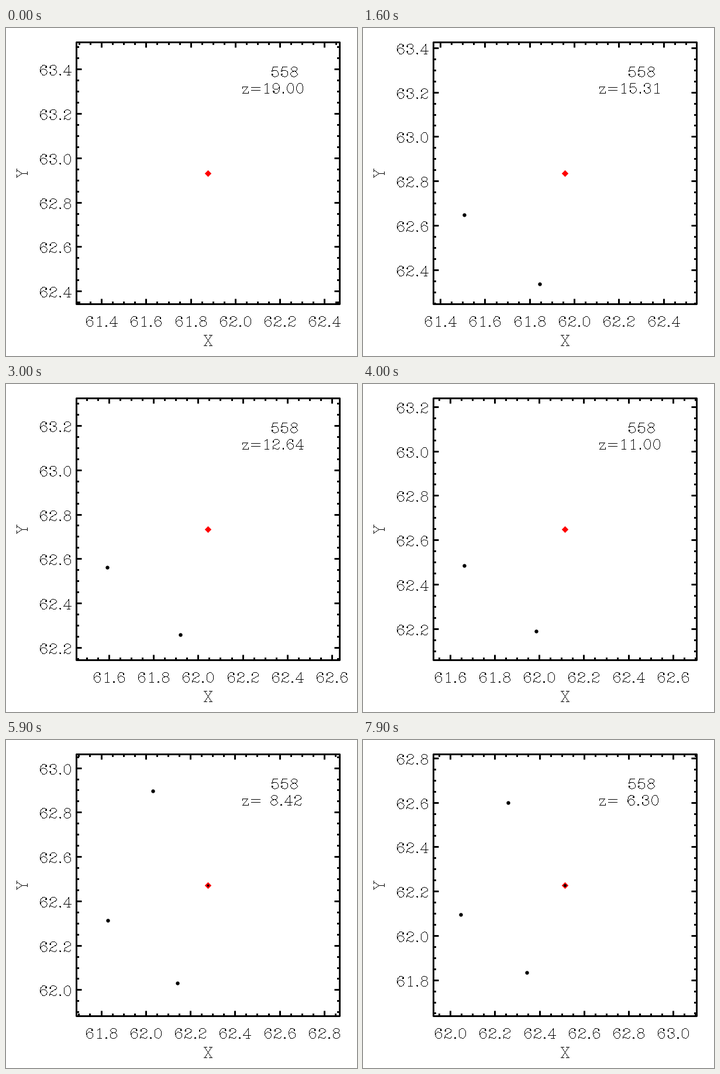
Write a matplotlib script that moves like this. It is 600 by 560 pixels and loops after 8000 ms.

```python
import matplotlib.pyplot as plt
import numpy as np
from matplotlib.animation import FuncAnimation
from matplotlib.collections import LineCollection
from matplotlib.patches import Circle, Polygon, Rectangle

W, H, DPI = 600, 560, 100
PX = 72 / DPI
FRAMES = 80
LEFT, RIGHT, TOP, BOTTOM = 120.5, 570.5, 24.5, 471.5
CX, CY = 345.5, 248.5
HALF = 0.59                # half the view, in data units
SX = (RIGHT - LEFT) / (2 * HALF)
SY = (BOTTOM - TOP) / (2 * HALF)
UNIT = 0.81                # pixels per font unit


# --- stroke font: baseline at 0, capital height 21 -------------------------
def arc(cx, cy, rx, ry, a0=0, a1=360):
    t = np.radians(np.linspace(a0, a1, int(abs(a1 - a0) / 20) + 2))
    return np.column_stack([cx + rx * np.cos(t), cy + ry * np.sin(t)])


def line(*pts):
    return np.array(pts, float)


def serif(x0, x1, y):
    return line((x0, y), (x1, y))


def ball(x, y):
    return arc(x, y, 1, 1)


SIX = [ball(5, 17), arc(0.5, 17, 5.5, 4, 90, 0),
       arc(0, 10.5, 7, 10.5, 90, 270), arc(0, 6.5, 7, 6.5, 170, -90)]

GLYPHS = {
    "0": [arc(0, 10.5, 7, 10.5)],
    "1": [line((-4, 17), (1, 21), (1, 0)), serif(-4, 5, 0)],
    "2": [ball(-6, 16), arc(0, 16, 7, 5, 180, -40), line((5, 13), (-2, 9)),
          arc(-1, 0, 6, 9, 97, 180),
          line((-7, 2), (-4, 3), (1, 0), (5, 0), (7, 4))],
    "3": [ball(-6, 16), arc(0, 16.5, 6.3, 4.5, 175, -90),
          ball(-6, 5), arc(0, 6, 7, 6, 90, -170)],
    "4": [line((3, 0), (3, 21), (-8, 6), (8, 6)), serif(-1, 6, 0)],
    "5": [line((5, 21), (-5, 21), (-7, 11), (-5, 13)),
          ball(-6, 5), arc(0, 7, 7, 7, 130, -160)],
    "6": SIX,
    "7": [line((-7, 21), (-7, 15)), line((-7, 17), (-4, 21), (3, 18), (7, 21)),
          line((7, 21), (6, 15), (1, 9), (0, 0))],
    "8": [arc(0, 16.5, 6, 4.5), arc(0, 6, 7, 6)],
    "9": [np.array([0, 21]) - s for s in SIX],
    ".": [ball(0, 1)],
    " ": [],
    "=": [serif(-9, 9, 12), serif(-9, 9, 6)],
    "z": [line((-6, 10), (-6, 14), (5, 14), (-6, 0), (6, 0), (6, 4))],
    "X": [line((-7, 21), (7, 0)), line((7, 21), (-7, 0))]
         + [serif(x, x + 6, y) for x in (-9, 3) for y in (0, 21)],
    "Y": [line((-7, 21), (0, 10), (0, 0)), line((7, 21), (0, 10)),
          serif(-9, -3, 21), serif(4, 10, 21), serif(-3, 4, 0)],
}
ADVANCE = {".": 10, " ": 16, "=": 26, "z": 17}   # all others 20


def text(page, s, x, y, align=0.0, upright=False):
    """Draw s in one-pixel strokes; (x, y) is the baseline point."""
    widths = [ADVANCE.get(c, 20) for c in s]
    pen = -align * sum(widths)
    for c, width in zip(s, widths):
        for p in GLYPHS[c]:
            u, v = (p[:, 0] + pen + width / 2) * UNIT, p[:, 1] * UNIT
            xy = (x - v, y - u) if upright else (x + u, y - v)
            stroke(page, np.floor(np.column_stack(xy)).astype(int))
        pen += width


def stroke(page, pts):
    for p, q in zip(pts[:-1], pts[1:]):
        n = np.abs(q - p).max() + 1
        cols, rows = np.rint(np.linspace(p, q, n)).astype(int).T
        page[rows, cols] = 0


# --- motion ----------------------------------------------------------------
KEYS = np.array([0, 40, 59, 79])
MID_X = [61.877, 62.115, 62.2785, 62.514]
MID_Y = [62.931, 62.648, 62.471, 62.2268]

# first time seen, then x and y in pixels at KEYS
DOTS = [(8, [174, 173, 174, 167], [325, 310, 308, 298]),
        (8, [306, 296, 293, 280], [447, 422, 415, 397]),
        (50, [253, 253, 251, 248], [70, 70, 87, 107])]
CORE_START = 50


def growth(i):
    """Scale factor 1 / (1 + z), growing at a constant rate from z = 19."""
    return np.exp(0.012762 * i) / 20


def marks(mid):
    """Tick steps of 0.05 inside the view."""
    return range(int(np.ceil((mid - HALF) * 20)), int((mid + HALF) * 20) + 1)


def pixel(v):
    return np.floor(v) + 0.5


# --- figure ----------------------------------------------------------------
fig = plt.figure(figsize=(W / DPI, H / DPI), dpi=DPI, facecolor="white")
ax = fig.add_axes([0, 0, 1, 1])
ax.axis("off")

blank = np.full((H, W), 255, np.uint8)
text(blank, "X", CX, 542, 0.5)
text(blank, "Y", 36, CY, 0.5, upright=True)
text(blank, "558", 452, 83.5)
sheet = ax.imshow(blank, cmap="gray", vmin=0, vmax=255, extent=(0, W, H, 0),
                  aspect="auto", interpolation="nearest", zorder=0)
ax.set_xlim(0, W)
ax.set_ylim(H, 0)

ax.add_patch(Rectangle((LEFT, TOP), RIGHT - LEFT, BOTTOM - TOP, fill=False,
                       ec="black", lw=3 * PX, joinstyle="round", snap=False))
ticks = LineCollection([], colors="black", linewidths=3 * PX,
                       capstyle="butt", snap=False)
ax.add_collection(ticks, autolim=False)

R = 5.7
ax.add_patch(Polygon([(CX - R, CY), (CX, CY - R), (CX + R, CY), (CX, CY + R)],
                     fc="red", ec="none", zorder=4))
core = ax.add_patch(Circle((CX, CY), 2, fc="black", ec="none", zorder=5))
dots = [ax.add_patch(Circle((0, 0), 3.2, fc="black", ec="none", zorder=5))
        for _ in DOTS]


def draw(i):
    a = growth(i)
    mx = np.interp(a, growth(KEYS), MID_X)
    my = np.interp(a, growth(KEYS), MID_Y)
    page, bars = blank.copy(), []
    text(page, f"z={1 / a - 1:5.2f}", 402.6, 111.5)

    for k in marks(mx):
        x = pixel(CX + (k / 20 - mx) * SX)
        size = 4.5 if k % 4 else 9
        bars += [[(x, TOP), (x, TOP + size)], [(x, BOTTOM), (x, BOTTOM - size)]]
        if k % 4 == 0:
            text(page, f"{k / 20:.1f}", x, 509.5, 0.5)

    for k in marks(my):
        y = pixel(CY - (k / 20 - my) * SY)
        size = 4.5 if k % 4 else 9
        bars += [[(LEFT, y), (LEFT + size, y)], [(RIGHT, y), (RIGHT - size, y)]]
        if k % 4 == 0:
            text(page, f"{k / 20:.1f}", 113, y + 10, 1)

    sheet.set_data(page)
    ticks.set_segments(bars)
    for dot, (start, xs, ys) in zip(dots, DOTS):
        dot.set_visible(i >= start)
        dot.center = pixel(np.interp(i, KEYS, xs)), pixel(np.interp(i, KEYS, ys))
    core.set_visible(i >= CORE_START)
    core.set_radius(np.interp(i, [CORE_START, FRAMES - 1], [1.6, 2.5]))
    return [sheet, ticks, core, *dots]


anim = FuncAnimation(fig, draw, frames=FRAMES, interval=100,
                     repeat=True, repeat_delay=0, blit=False)
plt.show()
```
